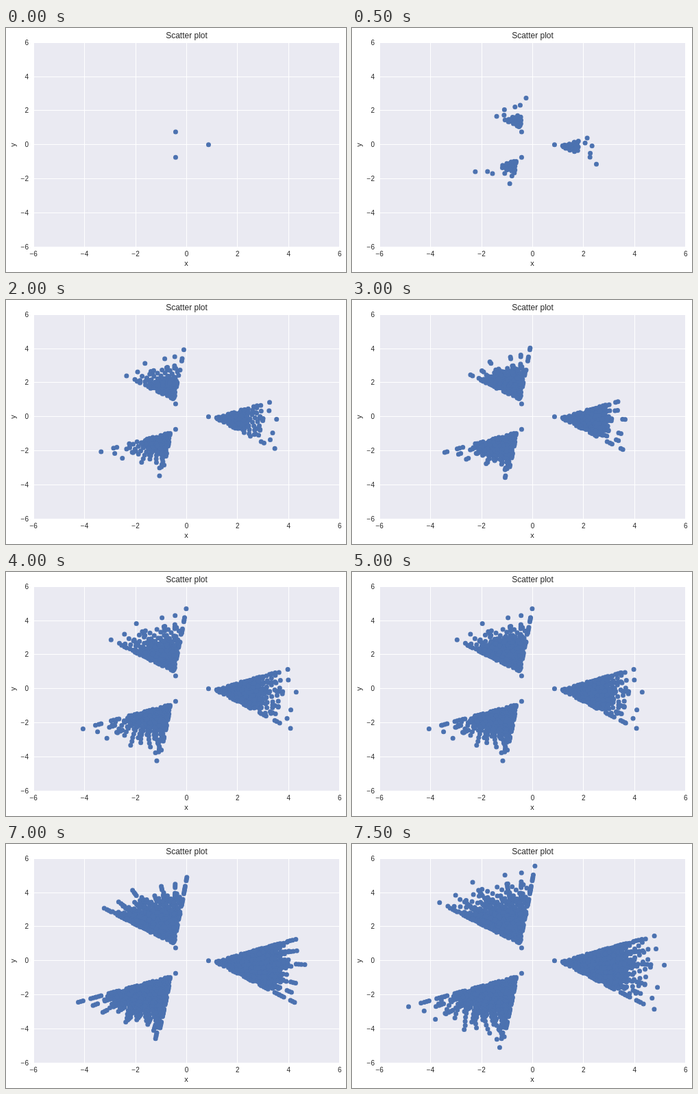
An HTML page that plays this animation: 496 px wide and 357 px high, repeating every 8000 ms.

```html
<!DOCTYPE html>
<html lang="en">
<head>
<meta charset="utf-8">
<title>Scatter plot</title>
<style>
  html, body { margin: 0; width: 100%; height: 100%; overflow: hidden; background: #fff; }
  svg { display: block; width: 496px; height: 357px; }
  text { font-family: "Liberation Sans", Arial, sans-serif; font-size: 10px; fill: #262626; }
</style>
</head>
<body>
<svg id="plot" viewBox="0 0 496 357"></svg>
<script>
const NS = 'http://www.w3.org/2000/svg';
const plot = document.getElementById('plot');
const LOOP = 8000, STEP = 500, STEPS = 16, PER_SECTOR = 512;

const px = x => 263.45 + x * 37.22;
const py = y => 170.65 - y * 24.91;

function add(parent, tag, attrs, text) {
  const el = document.createElementNS(NS, tag);
  for (const key in attrs) el.setAttribute(key, attrs[key]);
  if (text !== undefined) el.textContent = text;
  parent.appendChild(el);
  return el;
}

function drawAxes() {
  add(plot, 'rect', { x: 40, y: 21, width: 447, height: 299, fill: '#eaeaf2' });
  const grid = add(plot, 'g', { stroke: '#fff', 'stroke-width': 1, 'shape-rendering': 'crispEdges' });
  for (let v = -6; v <= 6; v += 2) {
    const x = Math.floor(px(v)) + 0.5, y = Math.floor(py(v)) + 0.5;
    const label = String(v).replace('-', '\u2212');
    add(grid, 'path', { d: `M${x} 21V320M40 ${y}H487` });
    add(plot, 'text', { x: px(v), y: 334, 'text-anchor': 'middle' }, label);
    add(plot, 'text', { x: 33, y: py(v) + 3.5, 'text-anchor': 'end' }, label);
  }
  add(plot, 'text', { x: 263.5, y: 15, 'text-anchor': 'middle', style: 'font-size:12px' }, 'Scatter plot');
  add(plot, 'text', { x: 263, y: 348, 'text-anchor': 'middle', style: 'font-size:11px' }, 'x');
  add(plot, 'text', { transform: 'translate(14 171) rotate(-90)', 'text-anchor': 'middle', style: 'font-size:11px' }, 'y');
}

// The long outer rays: x and y of the base, heading in degrees.
const rays = [
  [2.14, 0.39, 22], [2.06, 0.1, 12], [2.33, -0.07, -4],
  [2.26, -0.51, -22], [2.25, -0.74, -31], [2.5, -1.15, -37]
];
const lowerRays = [[2.43, 0.37, 22], [2.0, 0.22, 18], [2.01, -0.1, -4], ...rays.slice(3)];

const INNER = 25;
const apex = [1.1, -0.07];
const lengths = [0.53, 0.67, 0.77, 0.87];
const rad = deg => deg * Math.PI / 180;

// Inner rays fan out evenly from the apex in a shuffled order.
function innerRay(i) {
  const heading = 22 - 59 * (i * 7 % INNER) / (INNER - 1);
  const dist = 0.05 + 0.7 * i / INNER;
  return [
    apex[0] + dist * Math.cos(rad(heading)),
    apex[1] + dist * Math.sin(rad(heading)),
    heading
  ];
}

// Low five bits pick the ray, high four bits add lengths along it.
function place(index, outer) {
  if (index === 0) return [0.86, 0];
  const low = index & 31;
  const [x, y, heading] = low > INNER ? outer[low - INNER - 1] : innerRay(low);
  const reach = lengths.reduce((sum, len, i) => sum + (index >> (5 + i) & 1) * len, 0);
  return [x + reach * Math.cos(rad(heading)), y + reach * Math.sin(rad(heading))];
}

const countAt = step => Math.floor(1 + step * (PER_SECTOR - 1) / (STEPS - 1));

function drawBatch(step) {
  const group = add(plot, 'g', { fill: '#4c72b0' });
  for (let i = step ? countAt(step - 1) : 0; i < countAt(step); i++) {
    for (let sector = 0; sector < 3; sector++) {
      const [x, y] = place(i, sector === 2 ? lowerRays : rays);
      const turn = rad(120 * sector), c = Math.cos(turn), s = Math.sin(turn);
      add(group, 'circle', {
        cx: px(x * c - y * s).toFixed(2),
        cy: py(x * s + y * c).toFixed(2),
        r: 3.5
      });
    }
  }
  return group;
}

drawAxes();
const batches = Array.from({ length: STEPS }, (_, step) => drawBatch(step));
const start = performance.now();
let shown = -1;

function update(now) {
  const step = Math.floor(Math.max(0, now - start) % LOOP / STEP);
  if (step !== shown) {
    batches.forEach((g, i) => g.setAttribute('display', i <= step ? 'inline' : 'none'));
    shown = step;
  }
  requestAnimationFrame(update);
}
update(start);
</script>
</body>
</html>
```
